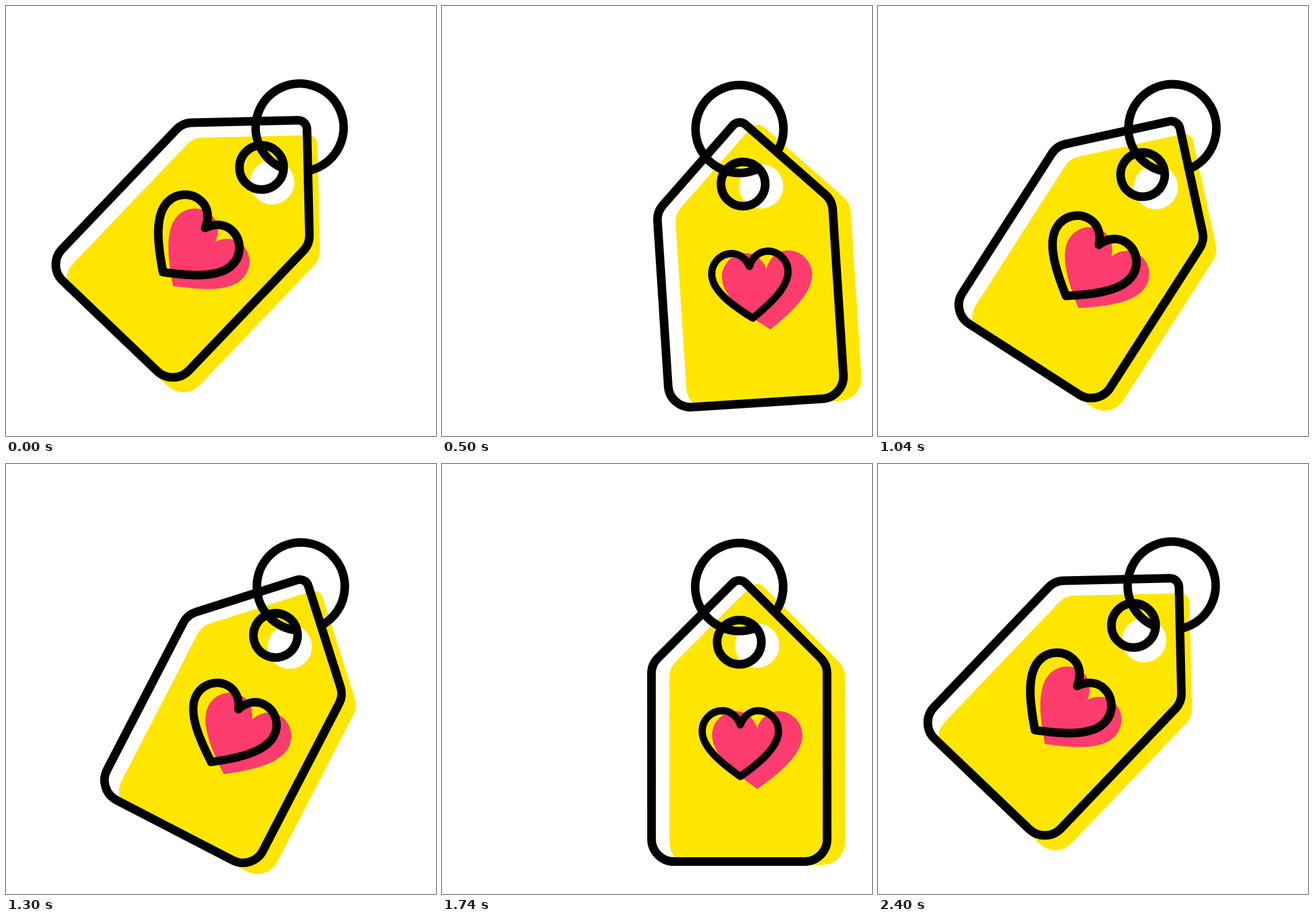
Animation, 748 px wide and 748 px high, one loop 2580 ms. Source, as an HTML page with a canvas:

```html
<!DOCTYPE html>
<html lang="en">
<head>
<meta charset="utf-8">
<title>Swinging price tag</title>
<style>
  html, body { margin: 0; width: 100%; height: 100%; overflow: hidden; background: #fff; }
  canvas { display: block; }
</style>
</head>
<body>
<canvas id="stage" width="748" height="748"></canvas>
<script>
const ctx = document.getElementById('stage').getContext('2d');
const LOOP = 2580, STEP = 20, LINE = 15;
const YELLOW = '#ffe600', PINK = '#ff3c6e', BLACK = '#000';

// All shapes are placed relative to the pivot the tag swings on.
const PIVOT = [517, 205], FILL_SHIFT = [31.2, 6];
const HOLE = { y: 104.9, r: 38.5 };
const RING = { y: 9, r: 76.5 };

// Poses: time, angle in degrees, size of the heart outline.
const KEYS = [
  [0, 43.7, 1], [600, -4.2, .845], [1200, 33.8, 1], [1800, -.15, .845],
  [2160, -.15, .845], [2400, 43.7, 1], [LOOP, 43.7, 1]
];

const smooth = s => s * s * (3 - 2 * s);

// cubic-bezier(1/3, 0, 0, 1)
function settle(x) {
  let lo = 0, hi = 1;
  for (let i = 0; i < 24; i++) {
    const s = (lo + hi) / 2;
    if (s * (1 - s) ** 2 + s ** 3 < x) lo = s; else hi = s;
  }
  return smooth(lo);
}

function poseAt(t) {
  const i = KEYS.findIndex(key => t < key[0]);
  const [t0, angle0, size0] = KEYS[i - 1], [t1, angle1, size1] = KEYS[i];
  const x = (t - t0) / (t1 - t0);
  const p = t < 1800 ? settle(x) : smooth(x);
  return { angle: angle0 + (angle1 - angle0) * p, size: size0 + (size1 - size0) * p };
}

function tagPath() {
  const w = 152.7, top = -9, shoulder = 143.7, bottom = 486.5;
  const path = new Path2D();
  path.moveTo(0, bottom);
  path.arcTo(-w, bottom, -w, shoulder, 39);
  path.arcTo(-w, shoulder, 0, top, 38);
  path.arcTo(0, top, w, shoulder, 15.7);
  path.arcTo(w, shoulder, w, bottom, 38);
  path.arcTo(w, bottom, 0, bottom, 39);
  path.closePath();
  path.moveTo(HOLE.r, HOLE.y);
  path.arc(0, HOLE.y, HOLE.r, 0, 2 * Math.PI);
  return path;
}

function ringPath() {
  const rad = Math.PI / 180, path = new Path2D();
  path.arc(0, RING.y, RING.r, 66 * rad, 395.4 * rad);
  return path;
}

const tag = tagPath();
const ring = ringPath();
const heart = new Path2D(`M0 0C6 -17 20 -29 37 -29C60 -29 78.5 -10 78.5 13
  C78.5 48 34 82 0 106.3C-34 82 -78.5 48 -78.5 13C-78.5 -10 -60 -29 -37 -29
  C-20 -29 -6 -17 0 0Z`);

function at(x, y, size, draw) {
  ctx.save();
  ctx.translate(x, y);
  ctx.scale(size, size);
  draw();
  ctx.restore();
}

function fill(path, color) {
  ctx.fillStyle = color;
  ctx.fill(path, 'evenodd');
}

function render(t) {
  const { angle, size } = poseAt(t);
  ctx.fillStyle = '#fff';
  ctx.fillRect(0, 0, 748, 748);
  ctx.strokeStyle = BLACK;
  ctx.lineWidth = LINE;
  ctx.lineJoin = 'round';
  at(...PIVOT, 1, () => {
    ctx.rotate(angle * Math.PI / 180);
    at(...FILL_SHIFT, 1, () => fill(tag, YELLOW));
    at(31.2, 254.1, 1, () => fill(heart, PINK));
    ctx.stroke(tag);
    ctx.stroke(ring);
    at(1.8, 248.7, size, () => ctx.stroke(heart));
  });
}

function tick() {
  const t = performance.now() % LOOP;
  render(Math.floor(t / STEP) * STEP);
  requestAnimationFrame(tick);
}
tick();
</script>
</body>
</html>
```
